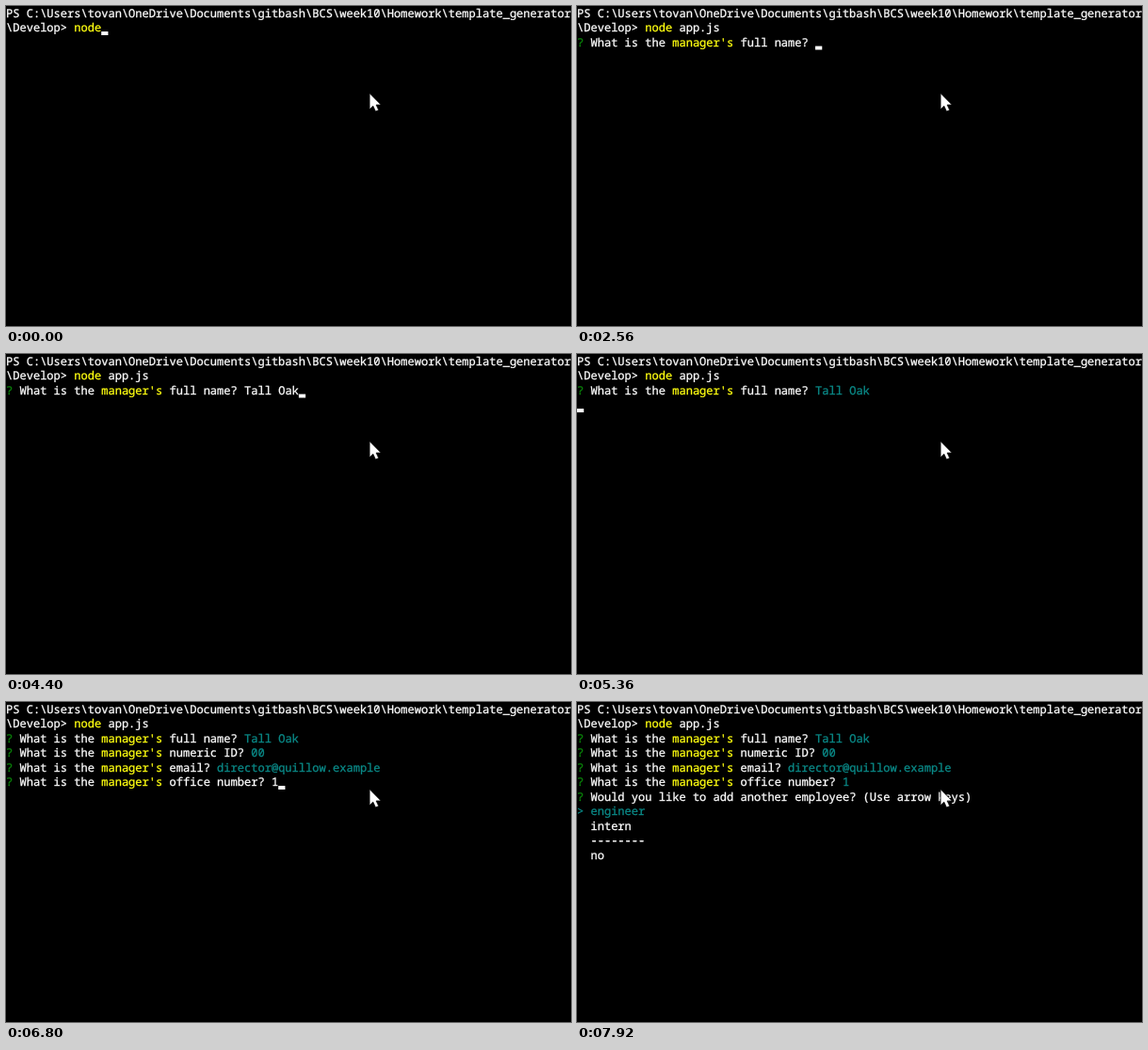
Write an HTML page that moves like this. It is 600 px wide and 340 px high and loops after 8 s.

```html
<!DOCTYPE html>
<html lang="en">
<head>
<meta charset="utf-8">
<title>Terminal session</title>
<style>
  html, body { margin: 0; width: 100%; height: 100%; overflow: hidden; background: #000; }
  svg { display: block; width: 600px; height: 340px; }
  text {
    font: 12.05px "Noto Sans Mono", "DejaVu Sans Mono", monospace;
    font-variant-ligatures: none;
    text-rendering: geometricPrecision;
    white-space: pre;
    color: #fff;
  }
  tspan { fill: currentColor; stroke: currentColor; stroke-width: .3px; }
  .yellow { color: #ffff10; }
  .green { color: #0a840a; }
  .teal { color: #0a8a88; }
</style>
</head>
<body>
<svg viewBox="0 0 600 340" xmlns="http://www.w3.org/2000/svg">
  <rect width="600" height="340"/>
  <g id="screen"></g>
  <rect id="caret" width="7.23" height="3.9" fill="#fff"/>
  <path d="M386.1 92.7V109.8L389.8 106.2L392.5 112L395.7 110.6L393.1 105H398.2Z"
        fill="#fff" stroke="#000" stroke-width=".7"/>
</svg>
<script>
const LOOP = 8000, BLINK = 530, CELL = 7.23, ROW = 15.5, BASELINE = 11.8;
const SVG = "http://www.w3.org/2000/svg";
const screen = document.getElementById("screen");
const caret = document.getElementById("caret");

// A line is a list of plain strings and [colour, string] pairs.
const path = ["PS C:\\Users\\tovan\\OneDrive\\Documents\\gitbash\\BCS\\week10\\Homework\\template_generator"];
const command = rest => ["\\Develop> ", ["yellow", "node"], rest];
const ask = (topic, rest) =>
  [["green", "?"], " What is the ", ["yellow", "manager's"], ` ${topic}? `, rest];
const answered = (topic, value) => ask(topic, ["teal", value]);
const blank = [];

const name = "Tall Oak", email = "director@quillow.example";
const shots = [];
const show = (time, lines, hasCaret = true) => shots.push({ time, lines, hasCaret });

// Shell command
const file = " app.js";
for (let i = 0; i <= file.length; i++)
  show(i * 160, [path, command(file.slice(0, i))]);
const started = [path, command(file)];
show(1360, [...started, blank]);

// Name
show(2400, [...started, ask("full name", "")]);
for (let i = 1; i <= name.length; i++)
  show(3120 + i * 160, [...started, ask("full name", name.slice(0, i))]);
const named = [...started, answered("full name", name)];

// Numeric ID, email and office number
show(4640, [...named, ask("numeric ID", "(00) ")]);
show(5360, [...named, blank]);
const numbered = [...named, answered("numeric ID", "00")];
show(5440, [...numbered, ask("email", `(${email}) `)]);
const mailed = [...numbered, answered("email", email)];
show(6000, [...mailed, ask("office number", "(1000) ")]);
show(6800, [...mailed, ask("office number", "1")]);
show(7280, [...mailed, blank]);

// Menu
const menu = [...mailed, answered("office number", "1"),
  [["green", "?"], " Would you like to add another employee? (Use arrow keys)"]];
show(7440, menu, false);
show(7520, [...menu, [["teal", "> engineer"]], ["  intern"], ["  --------"], ["  no"]], false);

function drawLine(parts, row) {
  const text = document.createElementNS(SVG, "text");
  text.setAttribute("y", BASELINE + row * ROW);
  for (const part of parts) {
    const [colour, words] = Array.isArray(part) ? part : ["", part];
    const span = document.createElementNS(SVG, "tspan");
    span.setAttribute("class", colour);
    span.textContent = words;
    text.append(span);
  }
  return text;
}

let current;
function draw(shot) {
  const lines = shot.lines.map(drawLine);
  screen.replaceChildren(...lines);
  caret.setAttribute("x", lines.at(-1).textContent.length * CELL);
  caret.setAttribute("y", lines.length * ROW - 3.9);
  current = shot;
}

const start = performance.now();
function tick() {
  const time = Math.max(0, performance.now() - start) % LOOP;
  const shot = shots.findLast(s => s.time <= time);
  if (shot !== current) draw(shot);
  const lit = (time - shot.time) % (2 * BLINK) < BLINK;
  caret.style.visibility = shot.hasCaret && lit ? "visible" : "hidden";
  requestAnimationFrame(tick);
}
tick();
</script>
</body>
</html>
```
